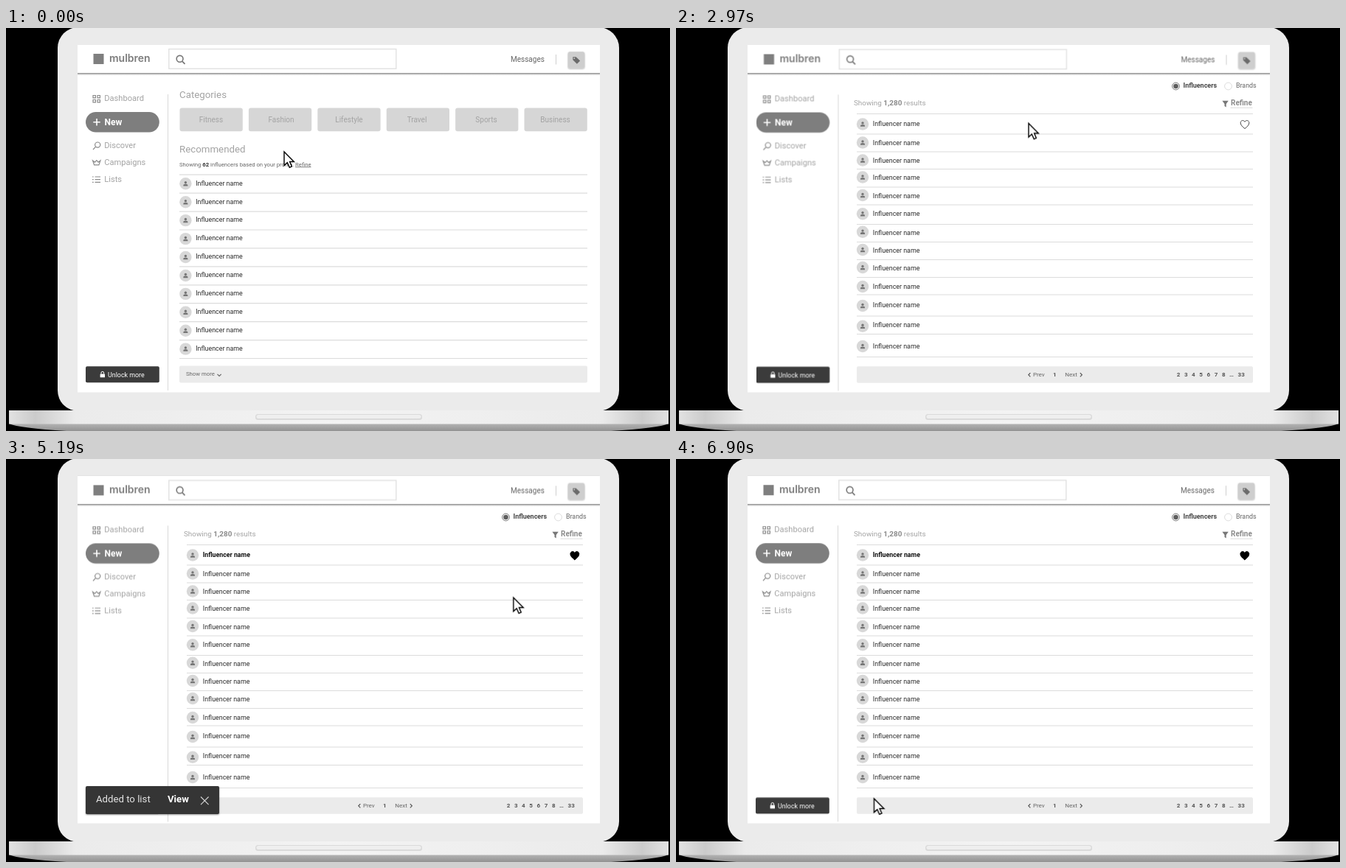
Write an HTML page that moves like this. It is 900 by 547 pixels and loops after 7200 ms.

```html
<!DOCTYPE html>
<html lang="en">
<head>
<meta charset="utf-8">
<title>Laptop prototype</title>
<style>
  html, body { margin: 0; width: 100%; height: 100%; overflow: hidden; background: #000; }
  svg { display: block; width: 100vw; height: 100vh; }
  text { font-family: Roboto, Arial, sans-serif; fill: #2b2b2b; }
  .b { font-weight: 700; }
  .gray { fill: #a3a3a3; }
  .mid { fill: #666; }
  .line { stroke: #dcdcdc; stroke-width: 1.2; }
  .icon { fill: none; stroke: #8a8a8a; stroke-width: 1.2; }

  #shell, #results, #liked, #toast, #cursor { animation: 7200ms linear infinite; }
  #shell { animation-name: nudge; animation-timing-function: step-end; }
  #results { animation-name: results; }
  #liked { animation-name: liked; }
  #toast { animation-name: toast; }
  #cursor { animation-name: move; }

  @keyframes nudge {
    0% { transform: none; }
    22% { transform: translate(.5px, .5px); }
    58% { transform: translate(0, .4px); }
    87.5%, 100% { transform: translate(0, .2px); }
  }
  @keyframes results {
    0%, 20.833% { opacity: 0; }
    22.5%, 100% { opacity: 1; }
  }
  @keyframes liked {
    0%, 57.083% { opacity: 0; }
    58.75%, 100% { opacity: 1; }
  }
  @keyframes toast {
    0%, 57.083% { opacity: 0; }
    58.75%, 86.25% { opacity: 1; }
    87.917%, 100% { opacity: 0; }
  }
  @keyframes move {
    0% { transform: translate(377px, 168px); }
    13.75% { transform: translate(377px, 168px); animation-timing-function: cubic-bezier(.3, .08, .6, .85); }
    20.7% { transform: translate(361.5px, 128px); }
    34.583% { transform: translate(361.5px, 128px); animation-timing-function: cubic-bezier(.3, .08, .6, .85); }
    55.417% { transform: translate(772.5px, 133px); }
    68.333% { transform: translate(772.5px, 133px); animation-timing-function: cubic-bezier(.3, .08, .6, .85); }
    85%, 100% { transform: translate(268.5px, 461px); }
  }
</style>
</head>
<body>
<svg viewBox="0 0 900 547" preserveAspectRatio="none">
  <defs>
    <linearGradient id="deck">
      <stop offset="0" stop-color="#e2e2e2"/>
      <stop offset=".04" stop-color="#cbcbcb"/>
      <stop offset=".1" stop-color="#ebebeb"/>
      <stop offset=".5" stop-color="#f3f3f3"/>
      <stop offset=".9" stop-color="#ebebeb"/>
      <stop offset=".96" stop-color="#cbcbcb"/>
      <stop offset="1" stop-color="#e2e2e2"/>
    </linearGradient>
    <linearGradient id="under" x2="0" y2="1">
      <stop offset="0" stop-color="#b4b4b4"/>
      <stop offset="1" stop-color="#929292"/>
    </linearGradient>
    <linearGradient id="shade" x2="0" y2="1">
      <stop offset="0" stop-color="#8c8c8c"/>
      <stop offset=".35" stop-color="#b8b8b8"/>
      <stop offset="1" stop-color="#fff" stop-opacity="0"/>
    </linearGradient>
    <filter id="drop" x="-10%" y="-20%" width="120%" height="150%">
      <feDropShadow dx="0" dy="1" stdDeviation="1.2" flood-opacity=".4"/>
    </filter>
    <g id="user">
      <circle r="8.2" fill="#d8d8d8"/>
      <circle cy="-1.6" r="1.7" fill="#757575"/>
      <path d="M-3 3.2v-1q0-1.8 3-1.8t3 1.8v1z" fill="#757575"/>
    </g>
    <path id="heart" d="M0 5.6C-3 3-5.8 .8-5.8-2.2C-5.8-5.8-1.6-6.6 0-3.6C1.6-6.6 5.8-5.8 5.8-2.2C5.8 .8 3 3 0 5.6z"/>
  </defs>

  <!-- laptop -->
  <rect x="70" y="-1" width="761" height="521" rx="28" fill="#ebebeb"/>
  <path d="M4 537H898Q884 543 820 547H82Q18 543 4 537z" fill="url(#under)"/>
  <rect x="4" y="519" width="894" height="18.5" fill="url(#deck)"/>
  <rect x="338" y="524" width="226" height="8" rx="3.5" fill="#dadada"/>
  <rect x="339.5" y="525" width="223" height="5" rx="2.5" fill="#efefef"/>
  <rect x="97" y="23" width="708" height="471.5" fill="#fff"/>

  <g id="shell">
    <rect x="118.5" y="35" width="14" height="14" fill="#7f7f7f"/>
    <text x="140" y="46.3" style="font:600 14px Inter,sans-serif;fill:#7c7c7c">mulbren</text>
    <rect x="220.8" y="28.6" width="308" height="26.6" fill="#fff" stroke="#e1e1e1" stroke-width="1.4"/>
    <path class="icon" d="M239 45.3L242.5 48.8" style="stroke:#777;stroke-width:1.8"/>
    <circle class="icon" cx="235.6" cy="41.8" r="4.4" style="stroke:#777;stroke-width:1.6"/>
    <text x="684" y="45.8" font-size="10" style="fill:#666">Messages</text>
    <path d="M745.5 36V49.5" stroke="#cfcfcf"/>
    <rect x="762" y="32.3" width="22" height="22" rx="2" fill="#cecece" filter="url(#drop)"/>
    <path d="M768.3 39.3h4.3l5.5 5.3-4.2 4.1-5.6-5.4z" fill="#6b6b6b"/>
    <circle cx="770.3" cy="41.2" r=".9" fill="#cecece"/>

    <path d="M219.5 90V492" stroke="#dcdcdc" stroke-width="1.2"/>
    <g id="menu" font-size="11.1"></g>
    <path class="icon" d="M118 91.5h3.4v3.4h-3.4zM124 91.5h3.4v3.4h-3.4zM118 97.5h3.4v3.4h-3.4zM124 97.5h3.4v3.4h-3.4z"/>
    <rect x="108" y="114" width="99.8" height="27.5" rx="13.75" fill="#7e7e7e"/>
    <path d="M118.3 127.7h9.4M123 123v9.4" stroke="#fff" stroke-width="1.6"/>
    <text class="b" x="133.5" y="131.8" font-size="12" style="fill:#fff">New</text>
    <g class="icon">
      <circle cx="124.2" cy="158.6" r="3.6"/>
      <path d="M121.6 161.2L118 165"/>
      <path d="M117.6 180l2 5.9h6.3l2-5.9-2.8 2.2-2.3-2.6-2.4 2.6z"/>
      <path d="M120.5 202h7.5M120.5 205.7h7.5M120.5 209.4h7.5M117 202h1.7M117 205.7h1.7M117 209.4h1.7"/>
    </g>
    <rect x="108" y="459.3" width="99.8" height="22" rx="2" fill="#3b3b3b"/>
    <rect x="127.6" y="469.5" width="6.4" height="4.8" rx=".6" fill="#fff"/>
    <path d="M129 469.5v-1.4a1.8 1.8 0 0 1 3.6 0v1.4" fill="none" stroke="#fff"/>
    <text x="138" y="473.6" font-size="8.9" style="fill:#fff">Unlock more</text>
  </g>

  <g id="home">
    <text class="gray" x="235" y="94.8" font-size="13.3">Categories</text>
    <g id="cards" font-size="10" text-anchor="middle"></g>
    <text class="gray" x="235" y="169.4" font-size="13.3">Recommended</text>
    <text class="mid" x="235" y="187.5" font-size="7.7">Showing <tspan class="b" fill="#333">62</tspan> influencers based on your profile. <tspan text-decoration="underline">Refine</tspan></text>
    <g id="picks"></g>
    <rect x="235" y="458.5" width="553" height="23" rx="2" fill="#ebebeb"/>
    <text class="mid" x="244" y="472.4" font-size="7.75">Show more</text>
    <path class="icon" d="M286.5 469.8l2.6 2.6 2.6-2.6" style="stroke:#666"/>
  </g>

  <g id="results">
    <rect x="221" y="64" width="583.5" height="430" fill="#fff"/>
    <circle cx="677.5" cy="79" r="4.9" fill="#fff" stroke="#777"/>
    <circle cx="677.5" cy="79" r="3.3" fill="#5e5e5e"/>
    <text class="b" x="687.5" y="81.4" font-size="9" style="fill:#444">Influencers</text>
    <circle cx="748.5" cy="79" r="4.9" fill="#fff" stroke="#ddd"/>
    <text class="mid" x="759" y="81.4" font-size="8.9">Brands</text>
    <text class="gray" x="241" y="104.6" font-size="9.9">Showing <tspan class="b" fill="#8a8a8a">1,280</tspan> results</text>
    <path d="M740.4 98.8h8.4l-3.1 4.2v4.4l-2.2-1.4v-3z" fill="#777"/>
    <text class="b" x="752" y="105.2" font-size="10" style="fill:#8c8c8c">Refine</text>
    <path d="M752 108.3H781" stroke="#bbb" stroke-dasharray="1 1"/>
    <g id="list"></g>
    <use href="#heart" x="771" y="131" fill="#fff" stroke="#444"/>
    <rect x="245" y="459.2" width="537" height="22.6" rx="2" fill="#ebebeb"/>
    <g id="pages" font-size="8" text-anchor="middle"></g>
    <path class="icon" d="M480.3 468.2l-2.5 2.6 2.5 2.6M547.8 468.2l2.5 2.6-2.5 2.6" style="stroke:#555"/>
  </g>

  <g id="liked">
    <path d="M97 22.6H804.5" stroke="#dedede" stroke-width=".8"/>
    <rect x="264" y="121" width="72" height="18" fill="#fff"/>
    <text class="b" x="266.7" y="132.7" font-size="8.8" style="fill:#111">Influencer name</text>
    <use href="#heart" x="770.8" y="131.3" fill="#000" stroke="#000"/>
  </g>

  <rect x="97" y="61" width="708" height="4" fill="url(#shade)"/>

  <g id="toast">
    <rect x="108" y="444" width="181" height="38" rx="2" fill="#353535" filter="url(#drop)"/>
    <text x="122" y="466" font-size="13.2" style="fill:#e4e4e4">Added to list</text>
    <text class="b" x="219" y="466" font-size="13.2" style="fill:#fff">View</text>
    <path d="M264 458.5l10.6 10.6M274.6 458.5L264 469.1" stroke="#d5d5d5" stroke-width="1.1"/>
  </g>

  <path id="cursor" d="M0 0V18.6L4.3 14.7L7.3 21.3L10.4 19.9L7.6 13.5H13.4z" fill="#fff" stroke="#000" stroke-width="1.4"/>
</svg>
<script>
  const fill = (id, parts) => document.getElementById(id).innerHTML = parts.join('');
  const label = (x, y, str, attrs = '') => `<text x="${x}" y="${y}" ${attrs}>${str}</text>`;
  const rule = (x1, x2, y) => `<path class="line" d="M${x1} ${y}H${x2}"/>`;
  const row = (x, textY, iconY) =>
    `<use href="#user" x="${x}" y="${iconY}"/>` + label(x + 13.8, textY + 2.9, 'Influencer name', 'font-size="8.9"');

  fill('menu', [['Dashboard', 99.3], ['Discover', 163.3], ['Campaigns', 186], ['Lists', 208.7]]
    .map(([name, y]) => label(133.3, y, name, 'class="gray"')));

  const cards = { Fitness: 278, Fashion: 373, Lifestyle: 465, Travel: 557, Sports: 651, Business: 744.5 };
  fill('cards', Object.entries(cards).map(([name, x], i) =>
    `<rect x="${235.5 + 93.4 * i}" y="108.5" width="85.3" height="31.8" rx="3" fill="#d6d6d6"/>` +
    label(x, 127.9, name, 'class="gray"')));

  const step = 24.93;
  fill('picks', Array.from({ length: 11 }, (_, i) =>
    rule(235, 788, 199.2 + step * i) + (i < 10 ? row(243.4, 210.7 + step * i, 211.3 + step * i) : '')));

  const lines = [116.5, 144, 168, 191.5, 216, 240, 266.5, 290.5, 314.5, 338.5, 362, 391, 415.5, 446.5];
  const names = [130, 155.8, 180, 203.2, 228, 251.6, 278.4, 302.4, 326, 350.8, 376.4, 403.5, 431.6];
  const icons = [130.5, 155.5, 179.5, 202.5, 227, 252.3, 276.7, 301, 325, 351, 377, 404.8, 432];
  fill('list', lines.map(y => rule(245, 782, y)).concat(names.map((y, i) => row(253, y, icons[i]))));

  const pages = [['1', 513.3], ['…', 753], ['33', 766.2]];
  for (let n = 2; n <= 8; n++) pages.push([n, 681 + 10.2 * (n - 2)]);
  fill('pages', [label(491.8, 472.6, 'Prev', 'class="mid"'), label(535.6, 472.6, 'Next', 'class="mid"')]
    .concat(pages.map(([n, x]) => label(x, 472.6, n, 'class="b" style="fill:#555"'))));
</script>
</body>
</html>
```
